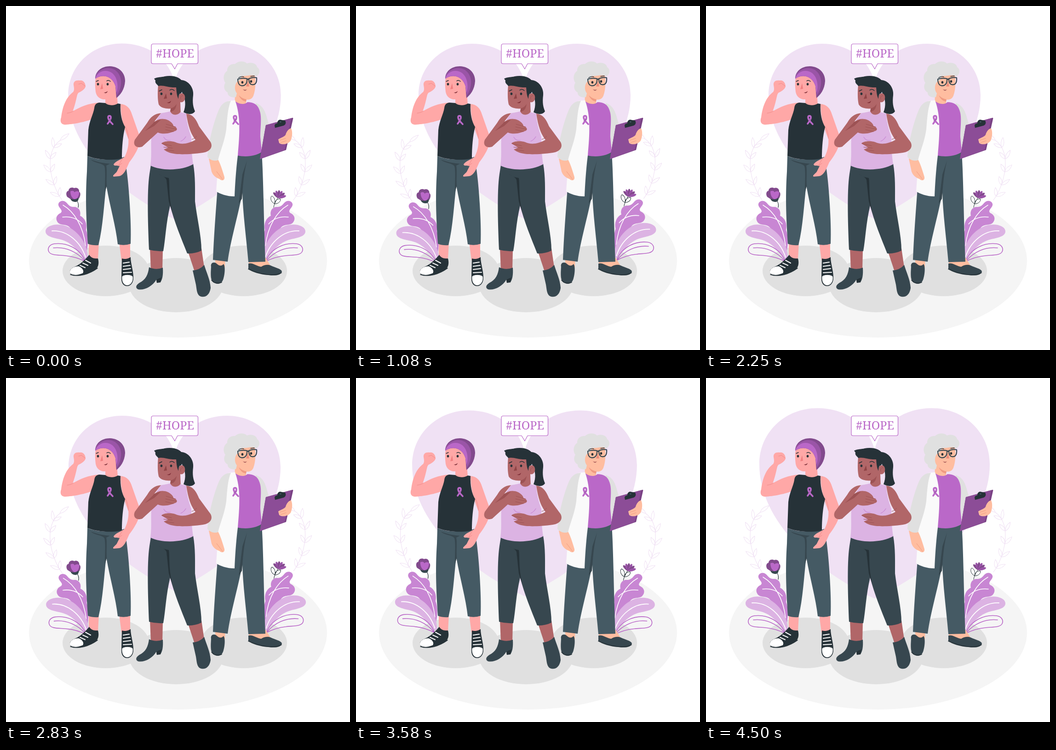
An HTML page with a canvas that plays this animation: 748 by 748 pixels, repeating every 4.54 s.

```html
<!DOCTYPE html>
<html lang="en">
<head>
<meta charset="utf-8">
<title>Hope</title>
<style>
html, body { margin: 0; width: 100%; height: 100%; overflow: hidden; background: #fff; }
canvas { display: block; }
</style>
</head>
<body>
<canvas id="stage" width="748" height="748"></canvas>
<script>
const ctx = document.getElementById('stage').getContext('2d');
const LOOP = 4540, FPS = 24;
const PURPLE = '#ba68c8', PLUM = '#824a8d', ORCHID = '#c886d3', LILAC = '#dcb3e3', PALE = '#f0e1f4';
const INK = '#263238', SLATE = '#37474f', STEEL = '#455a64', GREY = '#e0e0e0';
const PINK = '#ffa8a7', BROWN = '#b16668', PEACH = '#ffbda0';

const fill = (color, d) => { ctx.fillStyle = color; ctx.fill(new Path2D(d)); };
const line = (color, width, d) => {
  ctx.strokeStyle = color;
  ctx.lineWidth = width;
  ctx.stroke(new Path2D(d));
};
const oval = (color, x, y, rx, ry = rx) => {
  ctx.fillStyle = color;
  ctx.beginPath();
  ctx.ellipse(x, y, rx, ry, 0, 0, Math.PI * 2);
  ctx.fill();
};
const within = (draw) => { ctx.save(); draw(); ctx.restore(); };

// Double heartbeat: [ms, scale] pairs over a three second cycle.
const BEAT = [[0, 1.003], [250, 1.071], [335, 1.099], [580, 1.053], [890, 1], [1240, 1],
  [1500, 1.087], [1530, 1.096], [1630, 1.058], [1790, 1], [3000, 1]];
function heartScale(t) {
  const p = t % 3000;
  const i = BEAT.findIndex(k => k[0] > p);
  const [a, b] = [BEAT[i - 1], BEAT[i]];
  return a[1] + (b[1] - a[1]) * (p - a[0]) / (b[0] - a[0]);
}
// Triangle wave of one degree, 1.5 s per swing.
const swayAngle = t => Math.asin(Math.sin(t / 1500 * Math.PI * 2)) / 90;

function ground() {
  oval('#f5f5f5', 374, 554, 324, 167);
}

function shadows() {
  oval(GREY, 217, 576, 94, 55);
  oval(GREY, 517, 576, 94, 55);
  oval(GREY, 370, 607, 102, 59);
}

function heart(scale) {
  within(() => {
    ctx.translate(366.5, 272.5);
    ctx.scale(scale, scale);
    ctx.translate(-366.5, -272.5);
    fill(PALE, 'M366.5 165C352 110 305 82 252 82C188 82 136 130 136 194C136 310 250 408 366.5 463C483 408 597 310 597 194C597 130 545 82 481 82C428 82 381 110 366.5 165Z');
  });
}

function sprig() {
  const xs = [122, 98, 80, 118], ys = [422, 390, 318, 292];
  const at = (p, u) => {
    const v = 1 - u;
    return v * v * v * p[0] + 3 * v * v * u * p[1] + 3 * v * u * u * p[2] + u * u * u * p[3];
  };
  const leaf = (x, y, angle, size) => within(() => {
    ctx.translate(x, y);
    ctx.rotate(angle);
    line(PALE, 1, `M0 0Q${size * .4} -7 ${size} 0Q${size * .45} 6 0 0`);
  });
  line(PALE, 1.1, `M${xs[0]} ${ys[0]}C${xs[1]} ${ys[1]} ${xs[2]} ${ys[2]} ${xs[3]} ${ys[3]}`);
  for (let i = 0; i < 5; i++) {
    const u = .08 + i * .19;
    const x = at(xs, u), y = at(ys, u);
    const dir = Math.atan2(at(ys, u + .02) - y, at(xs, u + .02) - x);
    leaf(x, y, dir - .65, 22);
    leaf(x, y, dir + .6, 19);
  }
  leaf(xs[3], ys[3], -.65, 24);
}

function leaves() {
  fill(ORCHID, 'M176 532C179 515 179 500 174 487C177 474 172 461 161 456C164 444 156 436 147 437C140 437 136 433 132 428C126 421 116 423 114 430C112 438 126 444 119 450C108 455 107 465 114 472C121 478 133 473 140 483C148 495 166 505 176 532Z');
  line('#fff', 1.6, 'M124 433C148 447 168 478 173 522M123 459C140 457 154 461 166 474');
  fill(LILAC, 'M178 548C178 520 160 490 130 478C108 471 86 478 86 490C86 502 105 504 120 508C142 514 155 530 172 551Z');
  line('#fff', 1.8, 'M100 489C132 487 162 512 173 546');
  line(PURPLE, 1.6, 'M173 556C160 525 130 514 105 517C93 519 90 528 93 534C97 543 115 541 130 543C150 545 162 550 173 556ZM103 526C130 523 155 535 171 554');
}

function mirrored(sum, draw) {
  within(() => {
    ctx.translate(sum, 0);
    ctx.scale(-1, 1);
    draw();
  });
}

function plants(angle) {
  within(() => {
    ctx.translate(374, 374);
    ctx.rotate(angle);
    ctx.translate(-374, -374);
    sprig();
    mirrored(747, sprig);
    line(INK, 1.2, 'M154 423Q159 430 157 438');
    fill(PLUM, 'M133 415C129 408 132 402 136 402C136 396 143 393 148 396C155 393 160 399 159 404C163 406 162 413 159 418L147 424Z');
    fill(PURPLE, 'M140 403C144 401 147 401 149 405C152 402 157 402 159 405C159 412 156 418 150 421C143 418 140 411 140 403Z');
    fill(SLATE, 'M140 419C145 421 152 421 158 417C158 424 154 426 151 426C146 426 142 424 140 419Z');
    line(INK, 1, 'M582 438C583 430 587 424 591 417M584 430C575 426 574 416 578 413C584 416 586 423 584 430C585 422 592 418 597 420C597 427 589 431 584 430');
    for (let i = -2; i < 4; i++) {
      within(() => {
        ctx.translate(593, 417);
        ctx.rotate(i * .42 + .05);
        oval(i % 2 ? '#9a54a8' : PLUM, 0, -8, 3, 8.5);
      });
    }
    mirrored(737, leaves);
    leaves();
  });
}

function bubble() {
  const shape = 'M320 82.5H413.5Q417.5 82.5 417.5 86.5V121.5Q417.5 125.5 413.5 125.5H373L367 137L360 125.5H320Q316 125.5 316 121.5V86.5Q316 82.5 320 82.5Z';
  fill('#fff', shape);
  line(PURPLE, 1.2, shape);
  ctx.fillStyle = PURPLE;
  ctx.font = '25px "Noto Serif", serif';
  ctx.textAlign = 'center';
  ctx.fillText('#HOPE', 367.5, 112);
}

function ribbon(x, y) {
  within(() => {
    ctx.translate(x, y);
    line(PURPLE, 3.6, 'M-5 9C-2 5 3 -1 2 -6C1 -9 -4 -9 -4 -5C-4 0 1 5 6 10');
    line(PLUM, .8, 'M-4 3L3 -1');
  });
}

function face(ink, eyes, brows, nose, mouth, shade) {
  for (const [x, y] of eyes) oval(ink, x, y, 2.3, 2.8);
  line(ink, 1.4, brows);
  fill(shade, nose);
  fill('#7f3038', mouth);
}

function fighter() {
  fill(PINK, 'M180 514H202L200 550H180ZM246 514H270L270 553H251Z');
  fill(PINK, 'M147 172C146 164 152 161 160 162C168 160 173 168 173 175C172 181 162 187 157 189L155 193C152 206 149 219 145 229C160 220 180 211 203 210L187 246C170 253 140 258 127 258C119 257 117 250 120 242C123 220 129 200 146 187C149 183 148 178 147 172Z');
  line('#f08b8b', 1, 'M158 170L164 168L172 174M133 233Q142 232 147 228');
  fill(STEEL, 'M177 326C200 337 240 335 257 328C263 352 267 395 269 430C271 465 272 490 271 517Q257 522 243 518C239 480 226 435 218 390C213 430 211 480 201 520Q188 521 178 517C175 470 172 420 176 360Z');
  fill(SLATE, 'M184 334C196 343 208 341 214 348C217 360 215 380 215 405L219 392C218 372 220 356 218 347L226 343C214 342 201 340 184 334Z');
  fill(PINK, 'M249 213C262 214 270 222 274 236L293 290C290 307 279 326 268 340C262 353 257 368 246 370L234 371C230 368 240 364 242 358L247 348C242 346 234 349 234 344C240 336 252 333 258 328C266 312 267 298 266 288C259 272 250 250 249 213Z');
  line('#f08b8b', 1, 'M253 332L244 348L252 342M260 263Q266 274 266 288');
  fill(PINK, 'M195 156C193 167 194 178 195 187C197 199 208 204 216 203L216 215Q230 222 243 214L241 188L239 150L218 140Z');
  fill(INK, 'M203 210L216 211C222 217 236 217 243 212L249 213C248 234 252 252 259 263C254 282 252 308 252 331C240 336 200 336 177 326L179 270C181 250 190 235 192 222C193 214 196 211 203 210Z');
  fill(PLUM, 'M194 158C194 142 208 131 226 131C247 132 259 146 259 163C258 182 248 194 240 200L238 174C232 153 211 146 194 158Z');
  fill('#9a55a7', 'M196 150C203 137 222 130 237 139C254 151 254 176 241 195L238 174C232 153 211 146 194 158Z');
  fill(PURPLE, 'M194 158C199 141 218 136 231 146C243 156 245 176 240 189L238 174C232 153 211 146 194 158Z');
  face(INK, [[200, 170], [221, 170]], 'M196 164L201 162M219 163Q223 160 227 164', 'M209 168L205 181L211 180Z', 'M212 188Q217 189 221 185Q219 192 212 188Z', '#ef7f80');
  ribbon(226, 247);
  fill(INK, 'M181 541C186 550 195 549 200 549C203 560 201 570 191 576C175 584 155 588 142 584C137 580 138 573 145 569C160 563 170 554 181 541Z');
  fill('#fff', 'M139 580C138 571 148 566 158 566C167 570 170 576 167 581C155 586 143 586 139 580Z');
  line('#fff', 2, 'M161 564L172 569M167 559L178 564M173 553L184 559');
  line(INK, 1.6, 'M140 584C158 590 181 583 199 570');
  fill(INK, 'M252 549Q262 552 271 546C271 560 277 575 277 590C277 604 269 610 262 609C253 608 250 599 251 588Z');
  const toe = 'M252 588C256 583 272 583 276 588C278 601 270 608 263 608C254 607 251 598 252 588Z';
  fill('#fff', toe);
  line(INK, 1.2, toe);
  line('#fff', 2, 'M255 580L273 579M255 573L271 571M255 566L270 564M255 559L268 557');
}

function patient() {
  fill(INK, 'M374 161C396 158 409 178 407 194C405 210 407 220 411 229C405 238 394 235 386 231C392 216 390 202 384 191Z');
  fill(BROWN, 'M313 526L341 528L340 576H315ZM395 532L425 527L431 568L411 580Z');
  fill(SLATE, 'M315 346C340 358 385 356 407 343C412 370 411 400 411 425C415 460 425 500 425 532Q410 539 394 538C381 505 366 470 357 434C348 470 347 505 342 533Q326 534 311 530C309 480 306 405 312 365Z');
  fill(INK, 'M328 362C338 371 346 370 349 378L354 425L361 447L358 430C354 405 356 387 354 374C344 372 337 370 328 362Z');
  fill(BROWN, 'M331 172C329 190 330 205 332 214C336 222 350 224 358 223L357 238L380 238L379 209C390 212 393 193 384 190C379 189 376 193 374 197L370 165L338 164Z');
  fill('#9d5254', 'M358 223Q367 220 371 213Q369 229 357 230Z');
  fill(LILAC, 'M337 233Q350 231 357 229C361 239 374 238 379 231L392 234C393 256 398 270 403 285C403 315 405 330 407 344C386 357 340 360 314 347C318 320 313 295 318 270C321 255 330 244 337 233Z');
  fill(BROWN, 'M392 234C408 236 414 248 420 262L445 296C451 308 442 317 428 319C408 322 385 323 372 322C360 321 350 318 343 312L353 308L338 299C340 295 355 292 368 296C380 302 396 300 412 291C402 278 396 262 392 234Z');
  line('#9d5254', 1, 'M339 299L360 304M343 307L362 309M349 313L365 315M404 290Q412 288 414 283');
  line(ORCHID, 1.2, 'M343 285Q348 294 357 292M391 284Q387 291 380 294');
  fill(BROWN, 'M337 233C322 234 314 242 307 254L280 291C275 303 284 310 296 306L330 275C345 281 360 275 370 271C374 267 370 263 364 261C365 257 355 247 345 246C335 244 328 248 322 252Z');
  fill('#9d5254', 'M302 272L319 256L322 252L337 247L322 261Z');
  line('#9d5254', 1, 'M348 257L369 263M347 263L371 268M347 269L364 273');
  fill(INK, 'M322 158C330 154 338 155 345 153C362 150 380 154 384 166C387 174 383 190 380 190C376 191 375 195 375 202C371 194 371 187 370 177C354 178 341 171 331 174C330 171 323 168 325 162Z');
  line('#9d5254', 1, 'M380 203Q378 195 385 195');
  face(INK, [[338, 191], [359, 191]], 'M333 185L339 182M356 183Q361 179 366 184', 'M348 190L343 202L350 201Z', 'M350 210Q355 210 359 206Q357 214 350 210Z', '#8f4446');
  fill(SLATE, 'M311 568Q326 575 341 569C342 585 340 595 336 600L328 602L327 595C318 610 300 619 287 616C281 613 282 607 290 602C304 595 309 584 311 568Z');
  fill(INK, 'M327 595L338 590L336 601L328 602Z');
  fill(SLATE, 'M406 575Q421 574 431 563C436 580 444 595 445 613C443 628 434 634 425 632C415 630 415 618 413 606Z');
}

function doctor() {
  fill(PEACH, 'M455 545H477L476 568H455ZM528 548H565L576 566L555 570L528 562Z');
  fill(STEEL, 'M460 395L505 322C525 328 545 325 556 317C560 380 560 450 564 556L527 557C522 500 515 450 514 405C505 455 488 510 482 556L450 552C452 500 456 450 460 395Z');
  fill(SLATE, 'M524 336L514 366L506 430L513 419C515 395 516 368 524 336Z');
  fill(GREY, 'M543 211C558 216 564 228 569 249L577 278L557 326Z');
  fill(PEACH, 'M496 150L541 148C544 165 542 185 538 195C535 203 527 205 521 203L524 220L498 214Z');
  fill('#f09b82', 'M506 194Q514 202 523 203L522 208Q511 206 506 194Z');
  fill(PURPLE, 'M497 206C505 213 518 216 525 209C538 209 547 214 551 226C557 240 553 263 553 285L556 317C542 327 522 329 502 325Z');
  fill('#fafafa', 'M484 206L498 205C511 240 508 280 504 325C500 357 498 390 497 414C480 414 466 409 457 403C461 360 460 315 467 280Z');
  fill(PEACH, 'M441 332L461 334C466 343 470 355 475 372C476 381 468 380 464 376C455 373 447 366 446 355Z');
  line('#f09b82', 1, 'M458 360L471 377');
  fill(GREY, 'M489 206C474 207 467 215 461 230C451 256 441 292 438 328C444 336 455 338 461 335C467 312 476 292 479 268C481 245 482 222 489 206Z');
  ribbon(499, 247);
  fill(GREY, 'M500 198C488 201 481 193 482 188C474 184 472 174 477 167C469 155 476 144 481 141C480 130 490 125 498 126C507 118 519 120 524 125C537 120 546 128 546 133C554 138 552 148 545 153C533 147 523 154 513 152C511 159 506 164 502 165C497 172 496 182 502 190Z');
  face(INK, [[514, 166], [533, 164]], 'M506 156Q511 152 517 154M532 153L540 152', 'M526 164L529 175L522 175Z', 'M515 181Q520 184 524 181Q520 187 515 181Z', '#ed8b78');
  line(SLATE, 2.2, 'M504 159Q514 156 524 158C525 170 518 175 511 173C506 172 504 165 504 159ZM528 158Q537 154 545 156C546 168 541 172 535 171C529 170 528 164 528 158ZM524 160Q526 158 528 160');
  fill('#7a4285', 'M565 259L623 243Q625 243 624 246L609 313L552 333Z');
  fill('#8c4d97', 'M565 259L620 244L606 313L552 333Z');
  fill(INK, 'M584 260Q584 256 590 255C590 248 595 246 600 248L607 249Q611 256 604 260L585 265Z');
  oval(STEEL, 597, 252, 1.6);
  fill(PEACH, 'M592 290C600 285 606 284 608 280C610 272 616 266 620 266C624 274 622 286 619 293C612 302 599 302 594 298Z');
  line('#f09b82', 1, 'M595 292L608 288M597 297L609 293');
  fill(SLATE, 'M446 567C444 557 454 555 459 561Q467 568 473 561C477 565 476 582 473 592C470 605 460 606 453 602C444 599 445 583 446 567Z');
  fill(SLATE, 'M527 560C536 557 545 566 555 567C562 562 570 562 575 564C585 569 598 571 600 577C598 586 585 587 570 585C553 584 534 578 527 572Z');
  line(INK, 1.6, 'M527 572C551 583 583 589 599 580M447 596Q455 606 469 601');
}

function draw(t) {
  ctx.clearRect(0, 0, 748, 748);
  ctx.lineCap = ctx.lineJoin = 'round';
  ground();
  heart(heartScale(t));
  shadows();
  plants(swayAngle(t));
  bubble();
  fighter();
  doctor();
  patient();
}

const start = performance.now();
function tick(now) {
  const elapsed = Math.max(0, now - start) % LOOP;
  draw(Math.floor(elapsed * FPS / 1000) * 1000 / FPS);
  requestAnimationFrame(tick);
}
tick(start);
</script>
</body>
</html>
```
